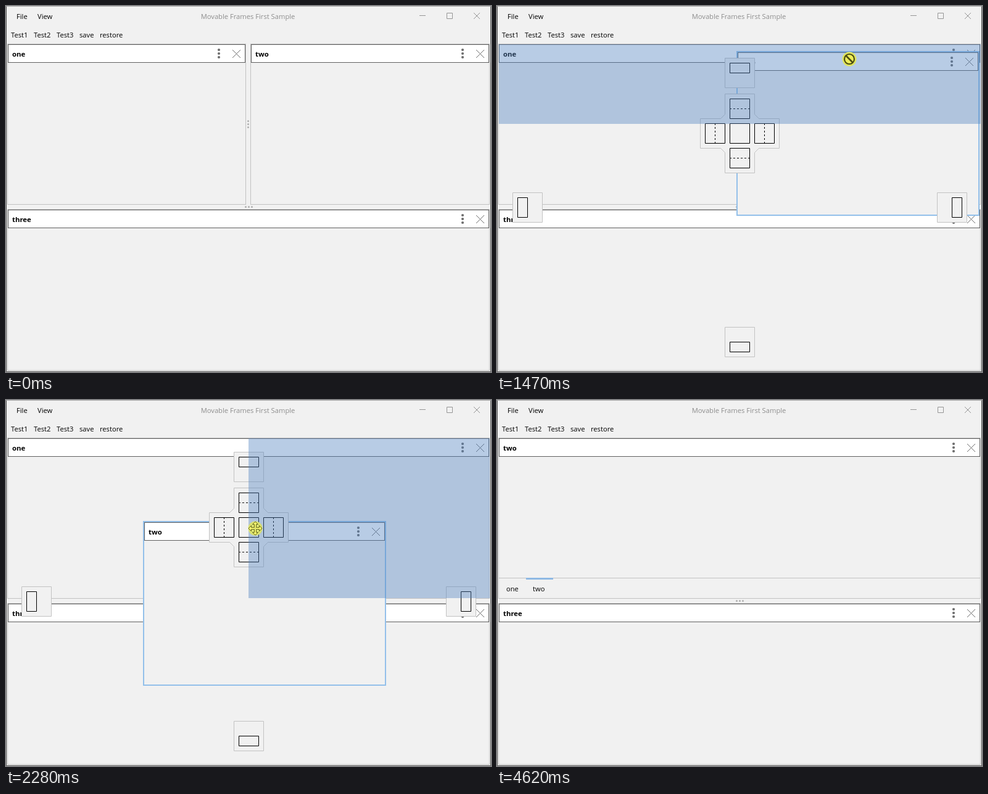
Write an HTML page that moves like this. It is 786 px wide and 593 px high and loops after 4.77 s.

```html
<!DOCTYPE html>
<html lang="en">
<head>
<meta charset="utf-8">
<title>Docking panels</title>
<style>
html, body { margin: 0; width: 100%; height: 100%; overflow: hidden; background: #f1f1f1; }
svg { display: block; width: 100vw; height: 100vh; }
text { font: 11.2px "Open Sans", "Noto Sans", sans-serif; fill: #000; white-space: pre; }
text.bold { font-weight: 700; font-size: 11.4px; }
</style>
</head>
<body>
<svg id="stage" viewBox="0 0 786 593"></svg>
<script>
const LOOP = 4770, PRESS = 1240, DRAG = 1430, DROP = 3000;
const BLUE = "#93c0ea", EDGE = "#c2c2c2", FACE = "#f1f1f1", ICON = "#6e6e6e";
const stage = document.getElementById("stage");

const fill = (x, y, w, h, color) =>
  `<rect x="${x}" y="${y}" width="${w}" height="${h}" fill="${color}"/>`;
const box = (x, y, w, h, face, stroke) =>
  `<rect x="${x + .5}" y="${y + .5}" width="${w - 1}" height="${h - 1}" fill="${face}" stroke="${stroke}"/>`;
const shape = (d, stroke, face = "none", extra = "") =>
  `<path d="${d}" fill="${face}" stroke="${stroke}" ${extra}/>`;
const label = (x, y, s, cls = "") => `<text x="${x}" y="${y}" class="${cls}">${s}</text>`;
const dot = (x, y, r, color) => `<circle cx="${x}" cy="${y}" r="${r}" fill="${color}"/>`;
const group = (id, body) => `<g id="${id}">${body}</g>`;
const turn = (i, body) => `<g transform="rotate(${i * 90})">${body}</g>`;
const quarters = make => [0, 1, 2, 3].map(make).join("");

const dots = (x, y, dx, dy, r, color) =>
  [-1, 0, 1].map(i => dot(x + i * dx, y + i * dy, r, color)).join("");
const grip = (x, y, dx, dy) => dots(x, y, dx, dy, 1.5, "#afafaf");

// Title strip with menu dots and a close cross
function header(x, y, w, name) {
  const right = x + w;
  return box(x, y, w, 30, "#fff", "#606060") +
    label(x + 7, y + 20, name, "bold") +
    dots(right - 43, y + 15, 0, 6, 2.1, ICON) +
    shape(`M${right - 21} ${y + 9}l13 13m0 -13l-13 13`, ICON);
}

const panel = (x, y, w, h, name) => box(x, y, w, h, FACE, EDGE) + header(x + 1, y + 1, w - 2, name);
const ring = (id, x, y, w, h) =>
  `<rect id="${id}" x="${x + 1}" y="${y + 1}" width="${w - 2}" height="${h - 2}" fill="none" stroke="${BLUE}" stroke-width="2"/>`;

// Drop targets: four at the window sides, and a cross over the panel
function handles() {
  const sides = quarters(i => `<g transform="translate(393.5 326.5)">` + turn(i,
    `<g transform="translate(0 ${i % 2 ? -344 : -218})">` +
    shape("M-24 -24h48v48h-48z", EDGE, FACE) + shape("M-16 -16h32v16h-32z", "#000") + "</g>") + "</g>");
  const arms = quarters(i => turn(i, shape("M-31 -24L-24 -31V-64H24V-31L31 -24", EDGE, FACE)));
  const slots = quarters(i => turn(i,
    shape("M-16 -56h32v32h-32z", "#000") + shape("M-16.5 -40h33", "#000", "none", 'stroke-dasharray="3 3"')));
  return sides + `<g transform="translate(393.5 206.5)">` + arms +
    fill(-30, -23.5, 60, 47, FACE) + fill(-23.5, -30, 47, 60, FACE) +
    slots + shape("M-16 -16h32v32h-32z", "#000") + "</g>";
}

const arrow = shape("M.5 .5V16.6L4.2 13.2L6.7 18.6L9.2 17.5L6.8 12.2H11.8Z", "#000", "#fff");
const spot = `<circle r="11.5" fill="#ff0" fill-opacity=".5"/>`;
const moveSign = dot(0, 0, 11.5, "#d9e070") +
  quarters(i => turn(i, shape("M-1.5 -1.5V-6.5H-4.5L0 -11L4.5 -6.5H1.5V-1.5", "#66681c", "#f5f56e")));
const stopSign = dot(0, 0, 11.5, "#dfe45c") +
  `<circle r="8" fill="#eeee58" stroke="#4c4d12" stroke-width="2.2"/>` +
  shape("M-5.5 -5.5L5.5 5.5", "#4c4d12", "none", 'stroke-width="2.6"');

stage.innerHTML =
  fill(0, 0, 786, 593, FACE) +
  label(17, 21, "File") + label(51, 21, "View") +
  `<text id="title" x="392" y="21" text-anchor="middle">Movable Frames First Sample</text>` +
  `<g id="buttons" fill="none"><path d="M670 15.5h10M714.5 11.5h9v9h-9zM758 11l10 10m0 -10l-10 10"/></g>` +
  [1, 2, 3].map(n => label(37 * n - 29, 51, "Test" + n)).join("") +
  label(119, 51, "save") + label(152, 51, "restore") +
  group("split", panel(2, 61, 387, 261, "one") + panel(396, 61, 388, 261, "two") + grip(392.5, 191.5, 0, 5)) +
  group("wide", panel(2, 61, 782, 261, "one")) +
  group("tabs", panel(2, 61, 782, 261, "two") + shape("M2 288.5H784", EDGE) +
    fill(47, 288, 44, 3, "#8fb9e4") + label(15, 310, "one") + label(58, 310, "two")) +
  grip(393.5, 325.5, 5, 0) +
  panel(2, 329, 782, 262, "three") +
  ring("ringTwo", 395, 60, 390, 263) + ring("ringTabs", 1, 60, 784, 263) + ring("ringThree", 1, 328, 784, 264) +
  `<path id="frame" d="M.5 0V592.5H785.5V0" fill="none"/><path id="topEdge" d="M0 .5H786"/>` +
  group("float", fill(0, 0, 394, 267, FACE) + header(2, 2, 390, "two") + ring("floatRing", 0, 0, 394, 267)) +
  group("handles", handles()) +
  `<rect id="overlay" y="62" fill="#4e80bf" fill-opacity=".4"/>` +
  group("pointer", group("arrow", arrow) + group("spot", spot) + group("stop", stopSign) + group("move", moveSign));

const el = {};
stage.querySelectorAll("[id]").forEach(n => el[n.id] = n);

const show = (id, on) => el[id].setAttribute("display", on ? "inline" : "none");
const put = (id, [x, y]) => el[id].setAttribute("transform", `translate(${x} ${y})`);

// bend is the starting speed per axis: 1 is steady, above 1 slows down, below 0 bows backwards
const leg = (start, end, from, to, bend = [1, 1]) => ({ start, end, from, to, bend });

const pointerLegs = [
  leg(20, 530, [480, 584], [554, 70], [1, 1.8]),
  leg(550, 960, [554, 70], [580, 73], [1, -21.5]),
  leg(DRAG, 2280, [580, 77], [404, 208], [1.06, 1.37]),
  leg(2380, 2400, [404, 208], [403, 210]),
  leg(3590, 4100, [421, 272], [472, 593], [1, .8])
];
const floatLegs = [
  leg(DRAG, 2280, [396, 65], [222, 196], [.93, 1.27]),
  leg(2380, 2400, [222, 196], [221, 198])
];

function along(legs, t) {
  const { start, end, from, to, bend } = legs.filter(l => l.start <= t).pop() || legs[0];
  const p = Math.min(1, Math.max(0, (t - start) / (end - start)));
  return from.map((a, i) => Math.round(a + (to[i] - a) * p * (bend[i] - (bend[i] - 1) * p)));
}

function render(t) {
  const within = (a, b) => t >= a && t < b;
  const drag = within(DRAG, DROP);
  const active = within(PRESS, DRAG) || within(DROP + 20, 4620);
  const pos = along(pointerLegs, t), y = pos[1];

  show("split", t < DRAG);
  show("wide", drag);
  show("tabs", t >= DROP);
  show("ringTwo", within(20, DRAG) && y >= 60 && y < 323);
  show("ringTabs", within(DROP + 20, 4100) && y < 323);
  show("ringThree", (within(20, DRAG) || within(DROP + 20, 4230)) && y >= 328);

  el.title.style.fill = active ? "#5a5a5a" : "#8e8e8e";
  el.buttons.setAttribute("stroke", active ? "#000" : "#959595");
  el.frame.setAttribute("stroke", active ? "#333" : "#505050");
  el.topEdge.setAttribute("stroke", active ? "#555" : "#a6a6a6");

  show("float", drag);
  show("handles", drag);
  show("overlay", drag);
  put("float", along(floatLegs, t));
  const rightHalf = within(1950, 2400);
  el.overlay.setAttribute("x", rightHalf ? 393 : 3);
  el.overlay.setAttribute("width", rightHalf ? 391 : 781);
  el.overlay.setAttribute("height", t < 1950 ? 129 : 259);

  show("pointer", within(20, 4100));
  put("pointer", pos);
  show("arrow", !drag);
  show("spot", within(PRESS, DRAG));
  show("stop", within(DRAG, 1510));
  show("move", within(1510, DROP));
}

const start = performance.now();
function tick() {
  render((performance.now() - start) % LOOP);
  requestAnimationFrame(tick);
}
render(0);
requestAnimationFrame(tick);
</script>
</body>
</html>
```
